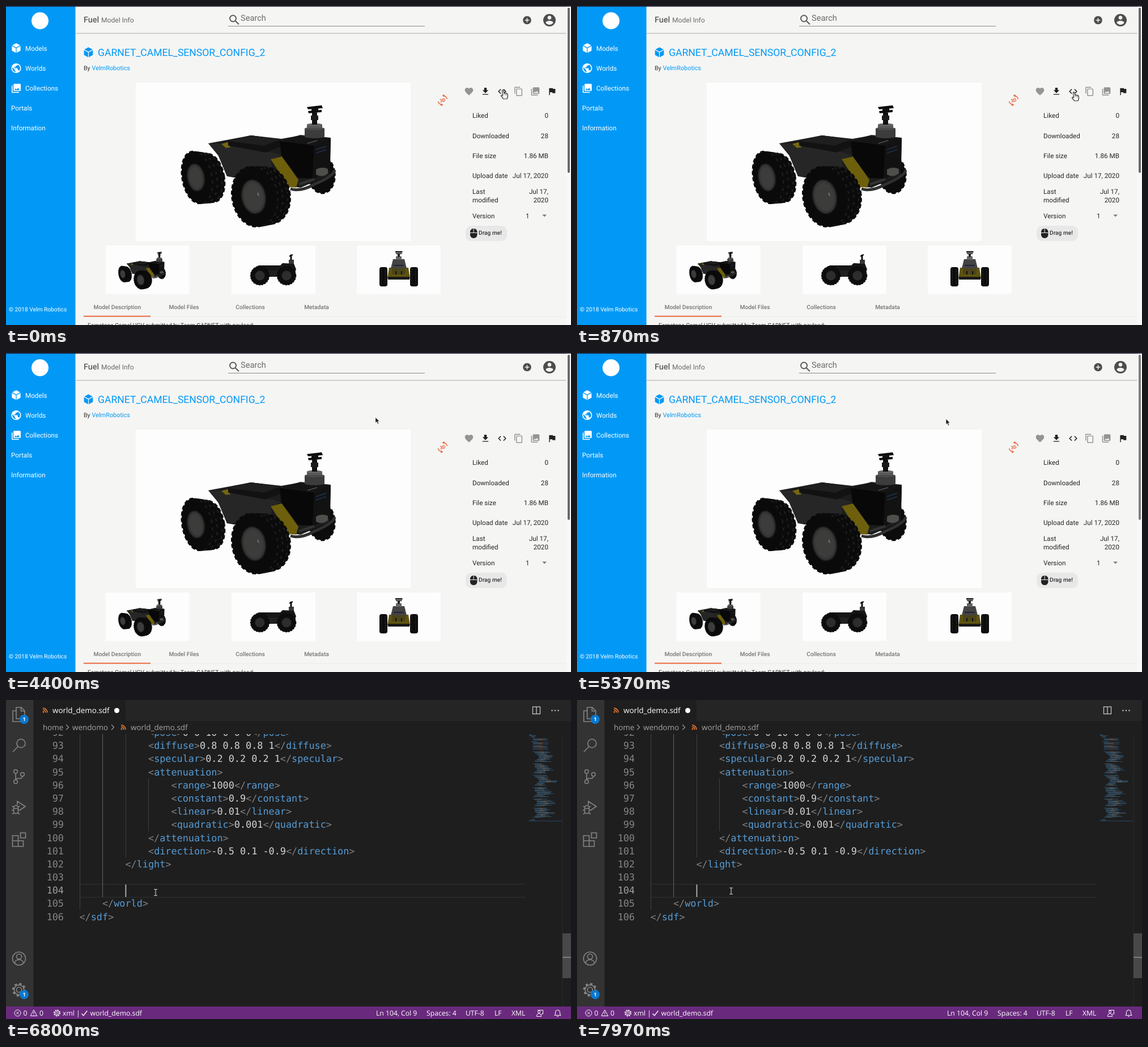
Recreate the animation shown at these times as an HTML page. Size 997 by 562 pixels, loop 8 s.

```html
<!DOCTYPE html>
<html lang="en">
<head>
<meta charset="utf-8">
<title>Copy a model snippet</title>
<style>
html, body { margin: 0; width: 100%; height: 100%; overflow: hidden; background: #f5f5f4; }
svg { display: block; width: 997px; height: 562px; }
text { text-rendering: geometricPrecision; font-family: Roboto, sans-serif; font-size: 11.7px; }
.ui text { font-family: "Open Sans", "Noto Sans", sans-serif; }
.ui .code text { font-family: "DejaVu Sans Mono", monospace; font-size: 16.82px; }
.line { fill: none; stroke: #858585; stroke-width: 1.6; }
.thin { fill: none; stroke: #fff; stroke-width: 1; }
</style>
</head>
<body>
<svg id="stage" viewBox="0 0 997 562"></svg>
<script>
const ICONS = {
  heart: 'M12 21.35l-1.45-1.32C5.4 15.36 2 12.28 2 8.5 2 5.42 4.42 3 7.5 3c1.74 0 3.41.81 4.5 2.09C13.09 3.81 14.76 3 16.5 3 19.58 3 22 5.42 22 8.5c0 3.78-3.4 6.86-8.55 11.54z',
  load: 'M19 9h-4V3H9v6H5l7 7zM5 18v2h14v-2z',
  code: 'M9.4 16.6L4.8 12l4.6-4.6L8 6l-6 6 6 6zM14.6 16.6l4.6-4.6-4.6-4.6L16 6l6 6-6 6z',
  copy: 'M16 1H4c-1.1 0-2 .9-2 2v14h2V3h12zM19 5H8c-1.1 0-2 .9-2 2v14c0 1.1.9 2 2 2h11c1.1 0 2-.9 2-2V7c0-1.1-.9-2-2-2zm0 16H8V7h11z',
  images: 'M22 16V4c0-1.1-.9-2-2-2H8c-1.1 0-2 .9-2 2v12c0 1.1.9 2 2 2h12c1.1 0 2-.9 2-2zm-11-4l2 2.7L16 11l4 5H8zM2 6v14c0 1.1.9 2 2 2h14v-2H4V6z',
  flag: 'M14.4 6L14 4H5v17h2v-7h5.6l.4 2h7V6z',
  add: 'M12 2a10 10 0 1 0 0 20a10 10 0 1 0 0-20zm5 11h-4v4h-2v-4H7v-2h4V7h2v4h4z',
  user: 'M12 2a10 10 0 1 0 0 20a10 10 0 1 0 0-20zm0 3a3 3 0 1 1 0 6a3 3 0 1 1 0-6zm0 14.2c-2.5 0-4.7-1.3-6-3.2 0-2 4-3.1 6-3.1s6 1.1 6 3.1c-1.3 1.9-3.5 3.2-6 3.2z',
  globe: 'M12 2a10 10 0 1 0 0 20a10 10 0 1 0 0-20zm-1 17.9c-4-.5-7-3.8-7-7.9 0-.6.1-1.2.2-1.8L9 15v1c0 1.1.9 2 2 2zm6.9-2.5c-.3-.8-1-1.4-1.9-1.4h-1v-3c0-.5-.4-1-1-1H8v-2h2c.6 0 1-.4 1-1V7h2c1.1 0 2-.9 2-2v-.4c2.9 1.2 5 4 5 7.4 0 2-.8 4-2.1 5.4z',
  cube: 'M12 1L21 5.8 12 10.6 3 5.8zM2.2 7.4l9 4.8V23l-9-5zM21.8 7.4l-9 4.8V23l9-5z'
};

const text = (x, y, s, a = '') => `<text x="${x}" y="${y}" ${a}>${s}</text>`;
const rect = (x, y, w, h, fill, a = '') => `<rect x="${x}" y="${y}" width="${w}" height="${h}" fill="${fill}" ${a}/>`;
const poly = (points, fill, a = '') => `<polygon points="${points}" fill="${fill}" ${a}/>`;
const path = (d, a) => `<path d="${d}" ${a}/>`;
const oval = (x, y, rx, ry, fill, a = '') => `<ellipse cx="${x}" cy="${y}" rx="${rx}" ry="${ry}" fill="${fill}" ${a}/>`;
const icon = (name, x, y, fill, k = .732) =>
  path(ICONS[name], `fill="${fill}" fill-rule="evenodd" transform="translate(${x} ${y}) scale(${k}) translate(-12 -12)"`);
const at = (x, y, s, a = '') => `<g transform="translate(${x} ${y})" ${a}>${s}</g>`;

// A wheel is a row of lugged, tilted rings pushed back from its face.
function wheel(x, y, rx, ry, dx, dy, hx, hy) {
  const ring = (k, w, h, fill, a = '') =>
    at(x + dx * k, y + dy * k, oval(0, 0, w, h, fill, `transform="rotate(-10)" ${a}`));
  let s = '';
  for (let i = 6; i >= 0; i--) {
    const k = i / 6, h = ry - 3 * k;
    s += ring(k, rx, h, '#0c0c0c', 'stroke="#0a0a0a" stroke-width="3" stroke-dasharray="7 4"');
    if (i % 2) s += ring(k, rx, h, 'none', `stroke="#222" stroke-width="2" stroke-dasharray="5 8" stroke-dashoffset="${i * 3}"`);
  }
  return s + ring(0, rx - 2, ry - 2, '#0a0a0a') +
    ring(0, hx, hy, '#343434', 'stroke="#1c1c1c" stroke-width="2"') + ring(0, hx - 4, hy - 5, '#3c3c3b');
}

const robot = '<g id="robot">' +
  oval(556, 296, 24, 34, '#0c0c0c', 'stroke="#0a0a0a" stroke-width="3" stroke-dasharray="7 4" transform="rotate(-8 556 296)"') +
  poly('357,242 395,235 432,228 486,234 520,228 573,233 571,298 520,320 484,316 390,300 375,264', '#1c1c1c') +
  poly('357,242 372,242 470,258 486,263 468,270 470,300 390,300 374,262', '#262626') +
  poly('380,243 391,240 396,249 388,250', '#75660f') +
  poly('392,238 432,228 484,235 484,248 458,258 392,246', '#121212') +
  poly('392,238 432,228 484,235 455,246', '#1f1f1f') +
  poly('467,270 487,265 516,306 512,320 499,319', '#6d5f0c') +
  poly('483,238 520,227 573,232 544,246', '#151515') +
  poly('483,238 544,246 541,304 515,303 486,264', '#080808') +
  poly('544,246 573,232 572,290 541,306', '#121212') +
  path('M532 242l17-5M519 227l26 4', 'stroke="#bbb" stroke-width="1" opacity=".55"') +
  path('M547 253l18-6M547 259l18-6', 'stroke="#1d2c42" stroke-width="2"') +
  wheel(335, 302, 24, 46, 26, 1, 15, 24) +
  wheel(437, 336, 38, 53, 26, -2, 21, 30) +
  path('M445 329q-2 4 2 5', 'fill="none" stroke="#aaa" stroke-width="1"') +
  path('M502 322q18 6 42-8q34-14 36-25', 'fill="none" stroke="#303030" stroke-width="5"') +
  path('M517 314l27-9', 'stroke="#333" stroke-width="4"') +
  path('M547 288q10-6 21-1v8q-10 8-21 2z', 'fill="#4e4e4a"') +
  rect(527, 216, 35, 14, '#3c3c3c') + oval(544.5, 230, 17.5, 3, '#3c3c3c') + oval(544.5, 216, 17.5, 3, '#4a4a4a') +
  rect(531, 209, 27, 6, '#585858') + oval(544.5, 209, 13.5, 2.5, '#666') +
  rect(540, 188, 9, 21, '#111') + rect(538, 193, 13, 8, '#1a1a1a') +
  poly('531,178 557,175 559,180 533,182', '#0b0b0b') + rect(539, 180, 12, 6, '#111') +
  poly('533,185 557,183 557,187 534,189', '#0b0b0b') + '</g>';

const sideView =
  poly('436,463 446,457 484,457 488,453 508,454 512,464 506,477 440,477', '#161616') +
  poly('455,466 488,466 484,476 462,476', '#202020') +
  rect(499, 447, 9, 7, '#383838') + rect(501.5, 438, 3, 10, '#111') + path('M500 441l6-3', 'stroke="#111" stroke-width="2"') +
  [448, 495].map(x => oval(x, 475, 16.5, 16.5, '#0d0d0d', 'stroke="#0a0a0a" stroke-width="1.5" stroke-dasharray="3 2"') +
    oval(x, 475, 8.5, 8.5, '#2d2d2d')).join('');

const frontView =
  poly('676,461 710,461 713,480 673,480', '#5f540d') + rect(674, 477, 38, 5, '#1a1a1a') +
  poly('683,446 703,446 707,462 679,462', '#444') + rect(684, 456, 18, 2, '#223') + rect(681, 462, 24, 11, '#4c451a') +
  path('M688 467v6M698 467v6', 'stroke="#111" stroke-width="2"') +
  rect(688, 441, 10, 6, '#666') + rect(691, 436, 4, 6, '#222') + rect(687, 432, 12.5, 2.5, '#111') + rect(688, 435.5, 10.5, 1.6, '#111') +
  [659, 713].map(x => rect(x, 460, 14, 34, '#0c0c0c', 'rx="4"') +
    path(`M${x + 3} 463v28M${x + 10} 463v28`, 'stroke="#202020" stroke-width="2" stroke-dasharray="2 2"')).join('');

const sidebar = rect(0, 1, 122.5, 561, '#0299f6') + '<circle cx="60" cy="26" r="15" fill="#fff"/>' +
  '<g fill="#fff">' + icon('cube', 18, 74, '#fff', .78) + icon('globe', 18, 109.5, '#fff', .86) + icon('images', 18, 145, '#fff', .8) +
  text(34, 78.5, 'Models') + text(34, 113.5, 'Worlds') + text(34, 149, 'Collections') +
  text(9, 184, 'Portals') + text(9, 219, 'Information') +
  text(5, 537.5, '© 2018 Velm Robotics', 'style="font-size:10.25px"') + '</g>';

const header = rect(122.5, 47.5, 866, 1.5, '#c3c3be') +
  text(137, 28.5, 'Fuel', 'fill="#5c5c5c" style="font-size:14.4px;font-weight:500"') +
  text(168, 28.5, 'Model Info', 'fill="#6a6a6a" style="font-size:12.1px"') +
  '<g fill="none" stroke="#5a5a5a" stroke-width="2"><circle cx="400.5" cy="22" r="5.5"/><path d="M404.5 26l6.3 6.3"/></g>' +
  text(414, 25.5, 'Search', 'fill="#6b6b6b" style="font-size:14.6px"') +
  rect(392, 35, 347, 1, '#8b8b8b') + icon('add', 919.5, 25, '#4d4d4d') + icon('user', 959, 25, '#4d4d4d', 1.1);

const facts = [[197, 'Liked', '0'], [232.5, 'Downloaded', '28'], [267.5, 'File size', '1.86 MB'],
  [302.5, 'Upload date', 'Jul 17, 2020'], [331, 'Last', 'Jul 17,'], [345.5, 'modified', '2020']]
  .map(([y, k, v]) => text(823, y, k) + text(957, y, v, 'text-anchor="end"')).join('');

const tools = [['heart', 817, '#949494'], ['load', 846, '#222'], ['code', 875.5, '#222'],
  ['copy', 904.5, '#949494'], ['images', 934, '#949494'], ['flag', 963.5, '#222']]
  .map(([n, x, c]) => icon(n, x, 150.5, c)).join('');

const tabs = [[196.3, 'Model Description'], [314, 'Model Files'], [431, 'Collections'], [548, 'Metadata']]
  .map(([x, s]) => text(x, 533.5, s, 'text-anchor="middle" fill="#757575" style="font-size:10.25px;font-weight:500"')).join('');

const badge3d = at(770.5, 166, '<g fill="none" stroke="#e8663c" stroke-width="1.4"><path d="M-8 2A8.3 8.3 0 0 0 -2 8M8 -2A8.3 8.3 0 0 0 2 -8"/></g>' +
  poly('-3,5.5 1,8.3 -3,10.5', '#e8663c') + poly('3,-5.5 -1,-8.3 3,-10.5', '#e8663c') +
  text(0, 3, '3D', 'text-anchor="middle" fill="#e8663c" transform="rotate(-12)" style="font-size:8.2px;font-weight:700"'));

const hand = path('M-3.5-7q1.7-1 2.5 .8l1 4.2q1.2-1 2 .2q1.4-.9 2.2 .5q1.6-.4 2 1.4l.3 3.4l-1.3 4.5h-6.5l-4.2-5.2q.2-1.6 2-.9l1 .8z',
  'fill="#f4f4f4" stroke="#333" stroke-width="1.2" stroke-linejoin="round"') + path('M0-2v3M2.2-1.5v3M4.3-1v3', 'stroke="#555" stroke-width=".7"');
const arrow = path('M0 0v10.3l2.4-2.1 1.8 4 1.9-.9-1.8-3.9h3.3z', 'fill="#1c1c1c" stroke="#fff" stroke-width=".8"');
const ibeam = path('M-3-5.5h2l1 .8 1-.8h2M0-4.7v9.4M-3 5.5h2l1-.8 1 .8h2', 'fill="none" stroke="#d8d8d8" stroke-width="1.1"');

const browser = rect(0, 0, 997, 562, '#f5f5f4') + sidebar + header + rect(0, 0, 997, 1.2, '#20203c') +
  rect(989, 1.2, 8, 561, '#f8f8f8') + rect(991, 3, 4, 291, '#696969', 'rx="2" id="thumb"') +
  icon('cube', 145.5, 81.5, '#0299f6', .8) +
  text(162, 88.3, 'GARNET_CAMEL_SENSOR_CONFIG_2', 'fill="#0299f6" style="font-size:17.57px"') +
  '<g style="fill:#333">' + text(137, 113, 'By', 'style="font-size:10.6px"') +
  text(151.5, 113, 'VelmRobotics', 'fill="#0299f6" style="font-size:10.9px"') + '</g>' +
  rect(229, 135, 485, 279, '#fdfdfd') + [175.5, 398, 619].map(x => rect(x, 422, 148, 85.5, '#fdfdfd')).join('') +
  robot + '<use href="#robot" transform="translate(102.9 379.2) scale(.308)"/>' + sideView + frontView + badge3d + tools +
  '<g fill="#262626">' + facts + text(823, 373.5, 'Version') + text(917, 373.5, '1') + '</g>' +
  poly('946.3,367.5 954,367.5 950.1,371.5', '#777') +
  rect(811, 387, 73, 27, '#e8e8e8', 'rx="10"') + rect(819, 392, 12.5, 17, '#222', 'rx="6"') +
  path('M819 399.5h12.5M825.2 392v7.5', 'stroke="#e8e8e8" stroke-width="1"') +
  text(834, 402.5, 'Drag me!', 'fill="#333" style="font-size:10.2px;font-weight:500"') +
  tabs + rect(137, 546.7, 851, 1, '#eaeae5') + rect(137, 545.6, 118, 2, '#ec6a41') +
  text(144, 565.5, 'Fernstone Camel UGV submitted by Team GARNET with payload:', 'fill="#333" style="font-size:10.25px"') +
  '<g id="tip" class="ui">' + rect(831, 171.5, 165, 31, '#000', 'rx="4" fill-opacity=".82"') +
  text(840.5, 190.8, 'Copy SDF snippet to clipboard', 'fill="#fff" style="font-size:10.42px"') + '</g>' +
  at(879, 159, `<g id="hand">${hand}</g>`) + at(651.7, 113, `<g id="arrow">${arrow}</g>`);

// Code area
const CH = 10.125, ROW = 23.19, X0 = 129.5;
const LINES = [[3, '<pose>0 0 10 0 0 0</pose>'], [3, '<diffuse>0.8 0.8 0.8 1</diffuse>'], [3, '<specular>0.2 0.2 0.2 1</specular>'],
  [3, '<attenuation>'], [4, '<range>1000</range>'], [4, '<constant>0.9</constant>'], [4, '<linear>0.01</linear>'],
  [4, '<quadratic>0.001</quadratic>'], [3, '</attenuation>'], [3, '<direction>-0.5 0.1 -0.9</direction>'],
  [2, '</light>'], [0, ''], [0, ''], [1, '</world>'], [0, '</sdf>']];
const span = (c, s) => `<tspan fill="${c}">${s}</tspan>`;
const paint = s => s.replace(/(<\/?)(\w+)(>)|([^<>]+)/g, (m, open, name, end, plain) =>
  plain ? span('#d4d4d4', plain) : span('#808080', open.replace('<', '&lt;')) + span('#569cd6', name) + span('#808080', '&gt;'));
const code = LINES.map(([tab, s], i) => {
  const y = 63 + i * ROW;
  return text(102, y, 92 + i, `text-anchor="end" fill="${i === 12 ? '#a0a0a0' : '#858585'}"`) + text(X0 + tab * 4 * CH, y, paint(s));
}).join('');
const guides = rect(130, 60, 1, 310, '#404040') + rect(170, 60, 1, 287, '#666') + rect(211, 60, 1, 217, '#404040') + rect(251, 138, 1, 93, '#404040');

// Minimap: each digit is a line's indent, a dash is an empty line
function minimap() {
  const light = '2333334444332--', model = '23344555554433--';
  const rows = '0011-222-1222-2222-2--' + model + light + model + light + '2344444433--' + light + '10';
  let seed = 7, s = '';
  const rnd = () => (seed = seed * 16807 % 2147483647) / 2147483647;
  [...rows].forEach((c, i) => {
    if (c === '-') return;
    const x = 923 + c * 3.4, y = 61 + i * 152 / rows.length;
    const w = 5 + rnd() * 9, v = c > 1 ? rnd() * 10 : 0;
    s += rect(x, y, w, .8, '#3d6f95') + rect(x + w, y, v, .8, i < 20 ? '#a0694f' : '#888') + rect(x + w + v, y, v ? w * .8 : 0, .8, '#3d6f95');
  });
  return `<g opacity=".75">${s}</g>` + rect(923, 212.5, 58, 1.2, '#28415c');
}

const rss = (x, y) => at(x, y, '<circle cx="-3" cy="3" r="1.5" fill="#e37933"/>' +
  path('M-4-.8a5 5 0 0 1 5 5M-4-3.8a8 8 0 0 1 8 8', 'fill="none" stroke="#e37933" stroke-width="1.7"'));
const count = y => `<circle cx="32" cy="${y}" r="8" fill="#0a78d0"/>` + text(32, y + 3.3, '1', 'text-anchor="middle" fill="#fff" style="font-size:9px;font-weight:700"');
const gear = (x, y, r, c, w) => at(x, y, `<g fill="none" stroke="${c}"><circle r="${r * .38}" stroke-width="${w}"/>` +
  `<circle r="${r * .72}" stroke-width="${w}"/><circle r="${r * .88}" stroke-width="${r * .26}" stroke-dasharray="${r * .345}"/></g>`);

const activity = rect(0, 0, 48.5, 540, '#333') + '<g class="line">' +
  '<path d="M18 13h9l6 6v14h-15zM26.5 13v6.5h6.5M18 19h-6v19h14v-5"/>' +
  '<circle cx="26.5" cy="76.5" r="7.5"/><path d="M21 82L12 91.5"/>' +
  '<circle cx="17" cy="126" r="3.3"/><circle cx="17" cy="144" r="3.3"/><circle cx="29" cy="131" r="3.3"/><path d="M17 129.3v11.4M29 134.3q0 4-5 4h-3q-4 0-4 2.4"/>' +
  '<path d="M20 185v-6.5l14 9-9.5 6.5M13.5 190a4 4 0 0 1 8 0v6a4 4 0 0 1-8 0zM13.5 191h8M11 187l3 2M24 187l-3 2M10 194h3.5M21.5 194h3.5M11 201l3-2M24 201l-3-2"/>' +
  '<path d="M11.5 239h10v9h9v10h-19zM11.5 248h10v10M25.5 234h9v9h-9z"/>' +
  '<circle cx="23" cy="455.5" r="11.5"/><circle cx="23" cy="452" r="4.5"/><path d="M15 463.5q1.5-6 8-6t8 6"/></g>' +
  count(34) + gear(23, 510.5, 12, '#858585', 1.6) + count(519);

const title = 'style="font-size:13.4px"';
const tabBar = rect(48.5, 0, 949, 37, '#252526') + rect(48.5, 0, 162.5, 37, '#1e1e1e') + rss(69, 18) +
  text(82, 22.5, 'world_demo.sdf', `fill="#fff" ${title}`) + '<circle cx="195.5" cy="18.5" r="4.5" fill="#fff"/>' +
  '<g fill="none" stroke="#c5c5c5" stroke-width="1.3"><rect x="929.5" y="12" width="13" height="12.5"/><path d="M936 12v12.5"/></g>' +
  [963.5, 969, 974.5].map(x => `<circle cx="${x}" cy="18.5" r="1.2" fill="#c5c5c5"/>`).join('') +
  `<g fill="#a5a5a5">` + text(65, 52.5, 'home', title) + text(117, 52.5, 'wendomo', title) + text(220, 52.5, 'world_demo.sdf', title) + '</g>' +
  '<path d="M106 43.5l4.5 4.5-4.5 4.5M186 43.5l4.5 4.5-4.5 4.5" fill="none" stroke="#999" stroke-width="1.2"/>' + rss(207, 48);

const status = rect(0, 540, 997, 22, '#692a7d') + '<g class="thin">' +
  '<circle cx="20.5" cy="551.5" r="5.5"/><path d="M18.3 549.3l4.4 4.4M22.7 549.3l-4.4 4.4M49 546l5.8 10.5h-11.6zM49 549.5v3.5M49 554v1.2"/>' +
  '<path d="M133.5 552.5l3.2 3.5 6.5-8.5" stroke-width="1.3"/>' +
  '<path d="M936.5 557.5q0-5 4-5t4 5zM938.5 549.5a2 2 0 1 0 4 0a2 2 0 1 0-4 0M938 546.5h9.5v6.5h-2l-2 2"/>' +
  '<path d="M968 555.5l1.5-2.5v-3q.5-4 4-4t4 4v3l1.5 2.5zM972 557.5h3"/></g>' + gear(90, 551.5, 6, '#fff', 1) + '<g fill="#fff">' +
  [[30.5, '0'], [59, '0'], [100, 'xml |'], [148.5, 'world_demo.sdf'], [653, 'Ln 104, Col 9'], [742, 'Spaces: 4'],
    [811, 'UTF-8'], [862, 'LF'], [892, 'XML']].map(([x, s]) => text(x, 556, s, 'style="font-size:12.2px"')).join('') + '</g>';

const editor = rect(0, 0, 997, 562, '#1e1e1e') +
  '<clipPath id="pane"><rect x="49" y="60" width="868" height="480"/></clipPath><g class="code" clip-path="url(#pane)">' +
  rect(129, 324, 788, 1, '#303030') + rect(129, 347, 788, 1, '#303030') + guides + code + rect(210.5, 325, 1.8, 22, '#b5b5b5') + '</g>' +
  minimap() + rect(981.5, 60, 1, 480, '#2b2b2b') + rect(982, 411, 15, 79, '#484848') + rect(982, 452.5, 15, 1.8, '#848484') +
  activity + tabBar + status + at(264, 339, `<g id="ibeam">${ibeam}</g>`);

document.getElementById('stage').innerHTML = browser + `<g id="editor" class="ui">${editor}</g>`;

// Steps are [ms, value]; equal times make a hard change.
const LOOP = 8000;
function play(id, prop, steps) {
  const all = [[0, steps[0][1]], ...steps, [LOOP, steps[steps.length - 1][1]]];
  document.getElementById(id).animate(
    all.map(([t, v]) => ({ offset: t / LOOP, [prop]: v })),
    { duration: LOOP, iterations: Infinity });
}
const move = (x, y) => `translate(${x}px, ${y}px)`;

play('hand', 'transform', [[630, move(0, -3.5)], [730, move(0, 0)]]);
play('hand', 'opacity', [[4400, 1], [4400, 0]]);
play('tip', 'opacity', [[1270, 0], [1400, 1], [4400, 1], [4400, 0]]);
play('arrow', 'opacity', [[4400, 0], [4400, 1]]);
play('arrow', 'transform', [[4400, move(0, 0)], [4530, move(-.8, 2.8)]]);
play('thumb', 'opacity', [[5330, 1], [5530, .25]]);
play('editor', 'opacity', [[6800, 0], [6800, 1]]);
play('ibeam', 'transform', [[6800, move(0, 0)], [7330, move(8, -2.5)]]);
</script>
</body>
</html>
```
